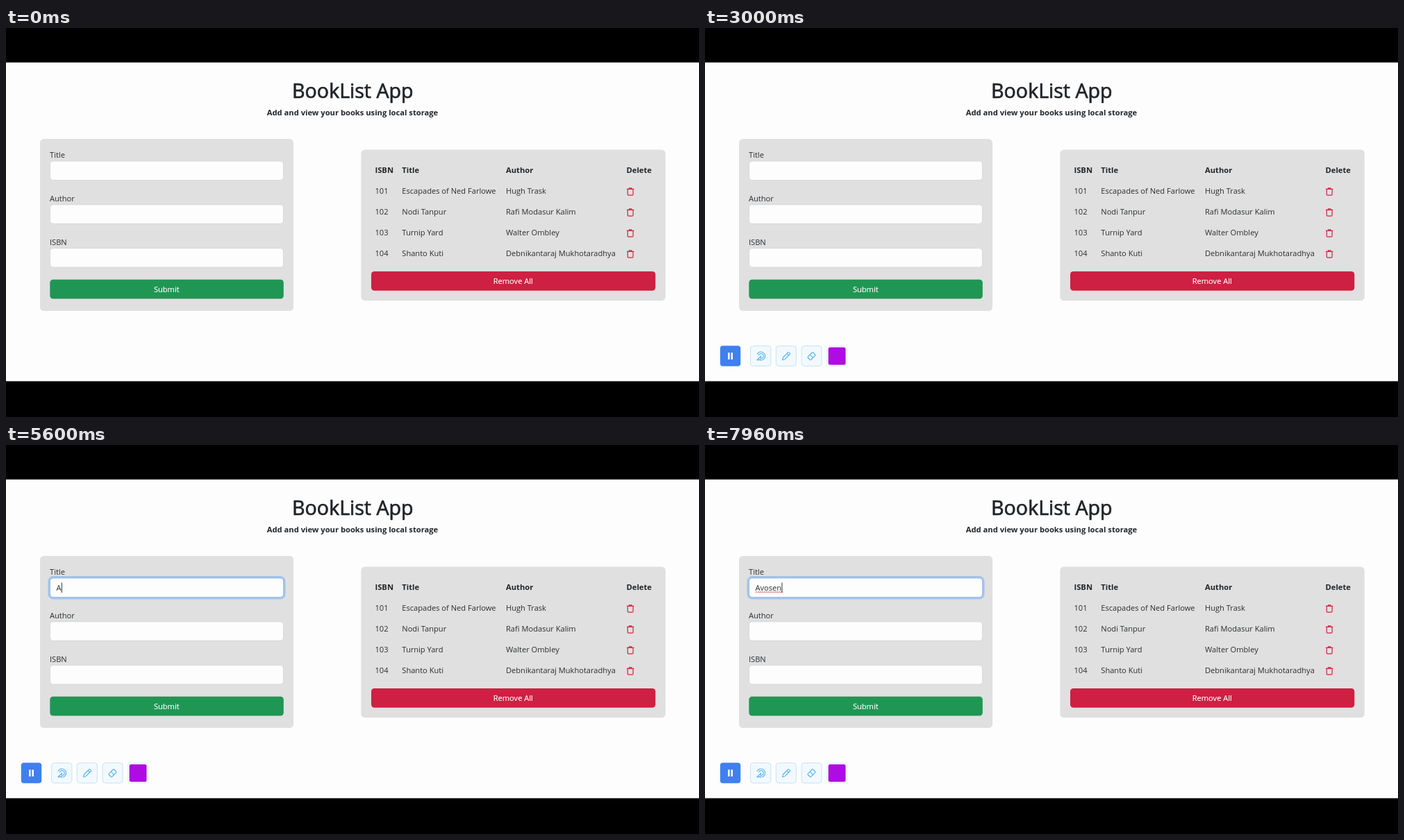
These frames come from a looping animation (998x561 px, 8 s). An HTML page:

```html
<!DOCTYPE html>
<html lang="en">
<head>
<meta charset="utf-8">
<title>BookList App</title>
<style>
  html, body { margin: 0; width: 100%; height: 100%; overflow: hidden; background: #000; }
  svg { display: block; width: 100vw; height: 100vh; }
  text { font: 11.1px "Open Sans", "Noto Sans", sans-serif; fill: #2a2d31; }
  .bold { font-size: 11.2px; font-weight: 700; fill: #212529; }
  .heading { font-size: 28.6px; fill: #212529; stroke: #212529; stroke-width: .7; }
  .middle { text-anchor: middle; }
  .light { fill: #fff; stroke: #fff; stroke-width: .15; }
  .panel { fill: #e0e0e0; }
  .field { fill: #fdfdfd; stroke: #ced4da; stroke-width: .8; }
  .tool { fill: #f2f9fe; stroke: #bfe1f7; stroke-width: .9; }
  .icon { fill: none; stroke: #55b2ec; stroke-width: 1.1; stroke-linejoin: round; stroke-linecap: round; }
  .trash { fill: none; stroke: #d3213f; stroke-width: 1.2; stroke-linejoin: round; }
</style>
</head>
<body>
<svg viewBox="0 0 998 561" preserveAspectRatio="none">
  <rect y="49.7" width="998" height="459.7" fill="#fdfdfd"/>
  <g id="page"></g>

  <g id="focus">
    <rect x="62" y="190.5" width="339" height="30.5" rx="6" fill="none" stroke="#0d6efd" stroke-opacity=".27" stroke-width="2.9"/>
    <rect class="field" style="stroke:#86b7fe" x="63.5" y="192" width="336" height="27.5" rx="4.5"/>
  </g>
  <text id="typed" x="72.5" y="210"></text>
  <path id="squiggle" fill="none" stroke="#e0303c" stroke-width=".8"/>
  <rect id="caret" y="198.5" width="1" height="14.5" fill="#303338"/>

  <g id="toolbar">
    <rect x="21.8" y="458.3" width="29.4" height="29.4" rx="4" fill="#3f80ee"/>
    <path d="M34.3 468.3v9.7M38.7 468.3v9.7" stroke="#fff" stroke-width="2.5"/>
    <rect class="tool" x="65.5" y="458.5" width="29.3" height="29" rx="4"/>
    <rect class="tool" x="102.3" y="458.5" width="29" height="29" rx="4"/>
    <rect class="tool" x="139" y="458.5" width="29" height="29" rx="4"/>
    <rect x="175.5" y="458.5" width="29" height="29" rx="4" fill="#fdfdfd" stroke="#dcefe8" stroke-width=".9"/>
    <rect x="177.6" y="460.6" width="24.9" height="25.1" rx="2.5" fill="#ae0ce3"/>
    <g class="icon">
      <path d="M75.2 470.3a6 6 0 1 1 5.8 8.7M77.5 471.8a3.5 3.5 0 1 1 4 4.7"/>
      <path d="M74.8 478.6l5.9-5.4-1.2 6.1-1.8-1.5-1.4 1.4z"/>
      <path d="M111.5 478.7l1-3.7 7-7.1q.8-.7 1.6 0l1 1q.8.8 0 1.6l-7 7.2zM118 469.5l2.6 2.6"/>
      <path d="M148.2 474.1l6-6.1q.7-.7 1.4 0l3 3q.7.7 0 1.4l-6 6.1q-.7.6-1.4 0l-3-3q-.6-.7 0-1.4zM151.2 471.2l4.2 4.2"/>
    </g>
  </g>

  <path id="pointer" d="M.5 .5v10.2l2.3-2 1.6 3.6 1.7-.8-1.6-3.4h3.2z" fill="#fff" stroke="#333" stroke-width=".85" stroke-linejoin="round"/>
</svg>
<script>
const LOOP = 8000;
const $ = id => document.getElementById(id);

const label = (x, y, string, cls = "") => `<text class="${cls}" x="${x}" y="${y}">${string}</text>`;
const box = (x, y, width, height, radius, attributes) =>
  `<rect x="${x}" y="${y}" width="${width}" height="${height}" rx="${radius}" ${attributes}/>`;

const books = [
  ["Escapades of Ned Farlowe", "Hugh Trask"],
  ["Nodi Tanpur", "Rafi Modasur Kalim"],
  ["Turnip Yard", "Walter Ombley"],
  ["Shanto Kuti", "Debnikantaraj Mukhotaradhya"]
];
const columns = [531.5, 570.3, 720, 893.5];

function bookRow([title, author], i) {
  const y = 238.5 + 30 * i;
  return [101 + i, title, author].map((cell, c) => label(columns[c], y, cell)).join("") +
    `<path class="trash" transform="translate(899.2 ${y - 2.6})"
      d="M-5.2-3.5H5.2M-1.8-3.7V-5H1.8V-3.7M-3.9-3.3V4Q-3.9 5.2-2.7 5.2H2.7Q3.9 5.2 3.9 4V-3.3"/>`;
}

$("page").innerHTML =
  label(499.3, 101, "BookList App", "heading middle") +
  label(499, 126, "Add and view your books using local storage", "bold middle") +
  box(49, 160, 365, 248, 5.5, 'class="panel"') +
  ["Title", "Author", "ISBN"].map((name, i) =>
    label(63, 187.3 + 62.8 * i, name) +
    box(63.5, 192 + 62.8 * i, 336, 27.5, 4.5, 'class="field"')).join("") +
  box(63.3, 362.8, 336.5, 27.8, 4.5, 'fill="#209654"') +
  label(231.3, 381, "Submit", "middle light") +
  box(511.3, 175.6, 438.5, 217.6, 5.5, 'class="panel"') +
  ["ISBN", "Title", "Author", "Delete"].map((name, i) => label(columns[i], 208.5, name, "bold")).join("") +
  books.map(bookRow).join("") +
  box(526, 351, 409.3, 27.8, 4.5, 'fill="#ce2042"') +
  label(730.3, 369.3, "Remove All", "middle light");

const WORD = "Avosen";
const FOCUS_AT = 4520;
const SQUIGGLE_AT = 7500;
const keyTimes = [5500, 5720, 5940, 6140, 6350, 6560];
// Pointer stops: [ms, x, y]
const pointerPath = [[1400, 540, 290], [1840, 454, 231], [2140, 402, 212]];

const show = (id, visible) => $(id).setAttribute("visibility", visible ? "visible" : "hidden");
const clamp = v => Math.min(1, Math.max(0, v));
const ease = v => v * v * (3 - 2 * v);

function drawPointer(t) {
  const next = pointerPath.findIndex(([time]) => time >= t);
  show("pointer", next > 0);
  if (next < 1) return;
  const [t0, x0, y0] = pointerPath[next - 1], [t1, x1, y1] = pointerPath[next];
  const p = ease((t - t0) / (t1 - t0));
  $("pointer").setAttribute("transform", `translate(${x0 + (x1 - x0) * p} ${y0 + (y1 - y0) * p})`);
}

function drawInput(t) {
  $("focus").setAttribute("opacity", ease(clamp((t - FOCUS_AT) / 150)));
  const pressed = keyTimes.filter(time => time <= t);
  $("typed").textContent = WORD.slice(0, pressed.length);
  const width = pressed.length ? $("typed").getComputedTextLength() : 0;

  // Every key press restarts the blink.
  const sinceInput = t - (pressed.at(-1) ?? FOCUS_AT);
  show("caret", sinceInput >= 0 && sinceInput % 1000 < 500);
  $("caret").setAttribute("x", 72.8 + width);

  show("squiggle", t >= SQUIGGLE_AT);
  $("squiggle").setAttribute("d", "M72.5 213" + "l1.5-1.7l1.5 1.7".repeat(Math.round(width / 3)));
}

function frame(now) {
  const t = now % LOOP;
  show("toolbar", t >= 400);
  drawPointer(t);
  drawInput(t);
  requestAnimationFrame(frame);
}
requestAnimationFrame(frame);
</script>
</body>
</html>
```
